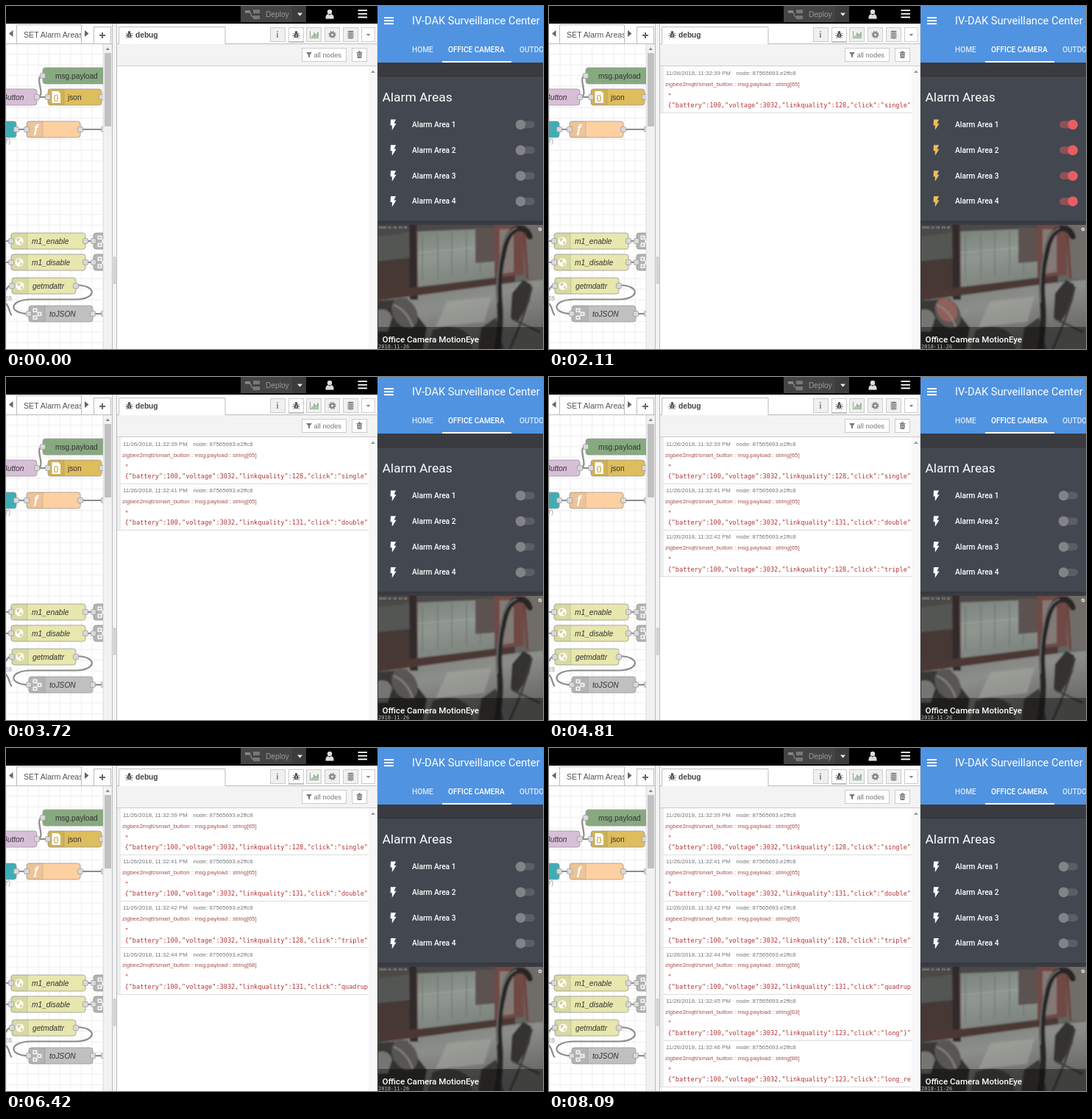
Animation of 730x467 px, one loop 8.16 s. Source, as an HTML page:

```html
<!DOCTYPE html>
<html lang="en">
<head>
<meta charset="utf-8">
<title>Smart button flow</title>
<style>
html, body { margin: 0; width: 100%; height: 100%; overflow: hidden; background: #fff; }
svg { display: block; width: 730px; height: 467px; }
text { white-space: pre; }
.ui { font-family: "Liberation Sans", Arial, sans-serif; font-size: 10.2px; }
.mat { font-family: Roboto, sans-serif; fill: #fff; }
.mono { font-family: "DejaVu Sans Mono", monospace; font-size: 8.59px; fill: #b23636; }
.small { font-size: 7.95px; }
.med { font-weight: 500; }
</style>
</head>
<body>
<svg id="stage" viewBox="0 0 730 467" xmlns="http://www.w3.org/2000/svg"></svg>
<script>
const LOOP = 8160;
const ON_AT = 1080, OFF_AT = 2980;
const messages = [
  { at: 950, sec: 39, len: 65, link: 128, click: 'single"' },
  { at: 2850, sec: 41, len: 65, link: 131, click: 'double"' },
  { at: 4100, sec: 42, len: 65, link: 128, click: 'triple"' },
  { at: 5450, sec: 44, len: 68, link: 131, click: 'quadruple"' },
  { at: 6500, sec: 45, len: 63, link: 123, click: 'long"}"' },
  { at: 7600, sec: 46, len: 86, link: 123, click: 'long_release"' }
];

const rect = (x, y, w, h, fill, more = '') =>
  `<rect x="${x}" y="${y}" width="${w}" height="${h}" fill="${fill}" ${more}/>`;
const path = (d, fill, more = '') => `<path d="${d}" fill="${fill}" ${more}/>`;
const line = (d, stroke, width = 1, more = '') =>
  path(d, 'none', `stroke="${stroke}" stroke-width="${width}" ${more}`);
const circle = (x, y, r, fill, more = '') =>
  `<circle cx="${x}" cy="${y}" r="${r}" fill="${fill}" ${more}/>`;
const text = (x, y, s, cls, more = '') =>
  `<text x="${x}" y="${y}" class="${cls}" ${more}>${s}</text>`;
const box = (x, y, w, h, stroke = '#ccc', fill = '#fff') =>
  rect(x + .5, y + .5, w, h, fill, `stroke="${stroke}"`);
const at = (x, y, s) => `<g transform="translate(${x} ${y})">${s}</g>`;

const bars = (x, y, w, gap) =>
  [0, 1, 2].map(i => rect(x, y + i * gap, w, 1.9, '#fff')).join('');

const bug = (x, y) => at(x, y,
  `<ellipse cy="1" rx="2.6" ry="3.6" fill="#555"/>` + circle(0, -3, 1.9, '#555') +
  line('M-4.5 -2L-2 0M4.5 -2L2 0M-5 1.5H5M-4.3 5L-2 3M4.3 5L2 3', '#555', .9) +
  line('M0 -1V4', '#ddd', .8));

// Editor, left part
function grid() {
  let d = '';
  for (let x = .5; x < 132; x += 14.55) d += `M${x.toFixed(1)} 52V467`;
  for (let y = 65.5; y < 467; y += 14.55) d += `M0 ${y.toFixed(1)}H132`;
  return line(d, '#eeeeee');
}
const wire = d => line(d, '#8c8c8c', 2.2);
const port = (x, y) => rect(x - 3.6, y - 3.6, 7.2, 7.2, '#d9d9d9', 'rx="2" stroke="#999" stroke-width=".8"');

function node(x, y, w, fill, label, labelX, o = {}) {
  const strip = o.icon ? path(`M${x + 3} ${y}H${x + 22}V${y + 22}H${x + 3}Q${x} ${y + 22} ${x} ${y + 19}V${y + 3}Q${x} ${y} ${x + 3} ${y}Z`, '#000', 'opacity=".06"') +
    line(`M${x + 22} ${y}V${y + 22}`, '#000', .7, 'opacity=".15"') + at(x + 11, y + 11, o.icon) : '';
  return rect(x, y, w, 22, fill, 'rx="3.5" stroke="#999" stroke-width=".8"') + strip +
    text(labelX, y + 14.6, label, 'ui', `fill="#333" ${o.italic ? 'font-style="italic"' : ''}`) +
    (o.noIn ? '' : port(x, y + 11)) + (o.noOut ? '' : port(x + w, y + 11));
}

const globe = circle(0, 0, 5.6, '#fff', 'opacity=".95"') +
  path('M-4 -2Q-2 -5 1 -4L0 -1L-2 1ZM1 1L4 0L3 4L1 4Z', '#d3d394');
const braces = path('M-5.5 -8H3L6 -5V8H-5.5Z', '#fff') +
  text(-3.4, 4, '{}', 'ui', 'fill="#c9a13c" font-weight="bold" style="font-size:9px"');
const func = text(-3, 5, 'ƒ', 'ui', 'fill="#fff" style="font-size:17px;font-weight:bold;font-style:italic"');
const blocks = [[-3, -5], [3, 0], [-3, 5]].map(([x, y]) =>
  rect(x - 2.5, y - 2.5, 6, 5.5, '#f5f5f5') + rect(x - .8, y - .8, 2.4, 2.2, '#aaa')).join('');

function flow() {
  const italic = true;
  return `<g clip-path="url(#canvas)">` + rect(0, 52, 132, 415, '#fff') + grid() +
    wire('M42 124H57M42 124C56 124 37 95 50 95') +
    wire('M14 168H28M101 168H132') +
    wire('M-6 320H7M-6 349H7M108 320H120M108 349H120') +
    wire('M-6 390C2 390 0 380 8 380M-6 403C6 404 3 418 8 421') +
    wire('M95 380C124 380 124 399 95 399.5H34C3 400 3 419 31 419') + wire('M118 419H132') +
    node(50, 84, 100, '#87a980', 'msg.payload', 67, { noOut: true }) +
    node(57, 113, 73, '#debd5c', 'json', 84, { icon: braces }) +
    node(-50, 113, 92, '#d8bfd8', 'Button', -5, { italic, noIn: true }) +
    node(-60, 157, 74, '#3fadb5', '', 0, { noIn: true }) +
    node(28, 157, 73, '#fdd0a2', '', 0, { icon: func }) + port(133, 168) +
    node(7, 309, 101, '#e7e7ae', 'm1_enable', 35, { italic, icon: globe }) +
    node(7, 338, 101, '#e7e7ae', 'm1_disable', 35, { italic, icon: globe }) +
    node(119, 309, 60, '#c0c0c0', '', 0, { icon: blocks }) +
    node(119, 338, 60, '#c0c0c0', '', 0, { icon: blocks }) +
    node(8, 370, 87, '#e7e7ae', 'getmdattr', 36, { italic, icon: globe }) +
    node(31, 408, 87, '#c0c0c0', 'toJSON', 59, { italic, icon: blocks }) + port(133, 419) +
    text(-2, 187, '7)', 'ui', 'fill="#999" style="font-size:9px"') +
    text(-2, 401, '28', 'ui', 'fill="#999" style="font-size:9px"') + '</g>';
}

function editorFrame() {
  const idle = '#f0f0f0';
  return rect(0, 0, 505, 24, '#000') +
    rect(319, 0, 89, 22, '#444') + rect(389, 0, 19, 22, '#3c3c3c') +
    rect(325, 6, 7, 3.5, '#888') + rect(336, 5, 9, 5, '#777') + rect(336, 13, 9, 5, '#777') +
    line('M330 8C335 8 331 15 337 15', '#888', 1.2) +
    text(353, 14.7, 'Deploy', 'ui', 'fill="#999"') + path('M396 9.5H403L399.5 13.5Z', '#eee') +
    circle(440, 8, 3.2, '#ddd') + path('M434.5 17.5V15Q435 11.5 438 11L440 12.5L442 11Q445 11.5 445.5 15V17.5Z', '#ddd') +
    bars(478.5, 5, 12.5, 4.7) +
    // workspace tabs and scrollbar
    rect(0, 24, 145, 28, '#fff') + line('M0 51.5H145M14.5 51V25.5H102.5V51', '#bbb') +
    `<g clip-path="url(#tab)">${text(24, 43, 'SET Alarm Areas', 'ui', 'fill="#555" style="font-size:10.6px"')}</g>` +
    path('M9.5 33V42L4 37.5ZM107 33V42L112.5 37.5Z', '#666') +
    box(119, 28, 23, 23, '#bbb') + line('M127 40H135M131 36V44', '#666', 2) +
    rect(132, 52, 13, 415, '#f1f1f1') + line('M132.5 52V467', '#e3e3e3') + path('M135.5 60H141L138.25 56.5Z', '#888') +
    rect(134, 64, 9, 100, '#c1c1c1') +
    // separator
    rect(145, 24, 6, 443, '#f3f3f3') + line('M144.5 24V467M150.5 24V467', '#bbb') +
    rect(146.5, 342, 2.5, 36, '#ddd', 'stroke="#aaa" stroke-width=".6"') +
    // sidebar
    rect(151, 24, 354, 443, '#fff') + line('M151 51.5H505', '#bbb') +
    path('M153.5 52V28.5H298V52', '#fff', 'stroke="#bbb"') +
    bug(167.5, 39) + text(176, 43, 'debug', 'ui', 'fill="#444" font-weight="bold"') +
    [359, 408, 433, 458].map(x => box(x, 29, 20, 19, '#ccc', idle)).join('') +
    box(384, 29, 20, 19) + box(483, 29, 18, 19) +
    text(367.3, 43, 'i', 'ui', 'fill="#888" font-weight="bold" style="font-family:Liberation Serif,serif;font-size:12px"') +
    line('M384 49H405', '#999') + bug(394.5, 39) +
    path('M413 34H414V43H425V44H413ZM415.5 40H417.3V42.5H415.5ZM418 36.5H419.8V42.5H418ZM420.5 38H422.3V42.5H420.5ZM423 35.5H424.8V42.5H423Z', '#8aa98b') +
    circle(443.5, 39, 2.7, 'none', 'stroke="#888" stroke-width="2.3"') +
    circle(443.5, 39, 4.3, 'none', 'stroke="#888" stroke-width="1.5" stroke-dasharray="1.8 1.58"') +
    [0, 1, 2, 3].map(i => `<ellipse cx="468.5" cy="${43.1 - i * 2.7}" rx="4.4" ry="1.8" fill="#888" stroke="${idle}" stroke-width=".6"/>`).join('') +
    path('M489.5 38H495.5L492.5 41Z', '#888') +
    rect(151, 52, 354, 29, '#f3f3f3') + line('M151 81.5H505', '#ccc') +
    box(402, 57, 60, 18) + path('M408 63H416L413 66.5V70.5L411 69V66.5Z', '#777') +
    text(418.5, 69.5, 'all nodes', 'ui', 'fill="#777" style="font-size:9.4px"') +
    box(470, 57, 20, 18) + path('M476.5 63H484.5V64H476.5ZM479 61.5H482V63H479ZM477.3 64.5H483.7L483.2 71H477.8Z', '#777') +
    line('M479.5 66V69.5M481.5 66V69.5', '#fff', .7) +
    rect(493, 82, 11, 385, '#f7f7f7') + path('M496 91H502L499 87.5Z', '#999') +
    line('M504.5 24V467', '#ddd');
}

function entry(m, i) {
  const y = i * 63.2;
  const json = `{"battery":100,"voltage":3032,"linkquality":${m.link},"click":"${m.click}`;
  return `<g class="entry" clip-path="url(#log)">` +
    rect(151, 82 + y, 5, 64, '#eee') +
    text(159, 94 + y, `11/26/2018, 11:32:${m.sec} PM`, 'ui small', 'fill="#777"') +
    text(254.5, 94 + y, 'node: 87565693.e2ffc8', 'ui small', 'fill="#777"') +
    text(158, 108.8 + y, `zigbee2mqtt/smart_button : msg.payload : string[${m.len}]`, 'ui small', 'fill="#a85050"') +
    text(161.5, 125.5 + y, '"', 'mono') + text(161.5, 138.2 + y, json, 'mono') +
    line(`M151 ${Math.round(146 + y) - .5}H493`, '#ddd') + '</g>';
}

// Dashboard, right part
const areaRow = i => {
  const y = 161.5 + i * 34.85;
  return path(`M523 ${y - 7}H530L527.5 ${y - 1.5}H530.5L524.8 ${y + 7.5}V${y + 1}H522.5Z`, '#fff', 'class="bolt"') +
    text(552, y + 3.3, `Alarm Area ${i + 1}`, 'mat med', 'style="font-size:10.2px"') +
    rect(694, y - 5, 25, 10, '#5b5e64', 'rx="5" class="track"') + circle(699.5, y, 6.8, '#7d7e80', 'class="thumb"');
};

function dashboard() {
  const tab = (x, s, o) => text(x, 63, s, 'mat med', `style="font-size:10.1px" opacity="${o}"`);
  return rect(505, 0, 225, 467, '#393b41') + rect(505, 0, 225, 77, '#5093e1') +
    bars(514, 15, 13, 4.1) +
    text(552, 24.8, 'IV-DAK Surveillance Center', 'mat', 'style="font-size:14.6px"') +
    tab(552, 'HOME', .8) + tab(601, 'OFFICE CAMERA', 1) + tab(698, 'OUTDOOR', .8) +
    rect(593, 75, 94, 2, '#fff') +
    rect(505, 95.5, 225, 197.5, '#434750') + line('M505 95.5H730M505 293H730', '#303238') +
    text(511.5, 130, 'Alarm Areas', 'mat', 'style="font-size:17.4px"') +
    [0, 1, 2, 3].map(areaRow).join('');
}

function camera() {
  const p = path;
  return `<g clip-path="url(#cam)"><g filter="url(#soft)">` + rect(500, 292, 236, 181, 'url(#floor)') +
    // room behind the glass
    p('M500 292H736V372L556 390L500 398Z', '#626561') +
    p('M558 304H674V368L558 384Z', 'url(#glass)') +
    p('M500 292H690V302L558 307L500 316Z', '#4b4846') +
    p('M500 314L548 309V344L500 348Z', '#535653') + p('M500 348L550 343V390L500 397Z', '#453836') +
    line('M566 312V374M587 310V372M606 308V368M626 308V366M645 308V364', '#6e756f', 1.6, 'opacity=".7"') +
    line('M560 336L668 326', '#a9b0a9', 1.2, 'opacity=".7"') +
    p('M638 302H664V348L638 350Z', '#5c5351') +
    p('M664 298H704V366L664 371Z', '#6f4844') + p('M671 304H690V362L671 365Z', '#837a76') +
    p('M706 292H736V372L710 371Z', '#706d69') + line('M704 298L709 371', '#753c38', 3) +
    // frames
    p('M548 292H558L560 400H549Z', '#302a29') + line('M559 306V386', '#684541', 1.3) +
    p('M500 388L548 384L692 367V376L560 394L500 402Z', '#4c3936') +
    // floor, lamp, cables and chair
    p('M500 402L546 398L552 473H500Z', '#393836') +
    p('M600 402L660 396L650 430L584 437Z', '#a9aba6', 'opacity=".5"') +
    p('M506 430Q525 402 548 407L572 438L566 473H506Z', '#30302f') +
    `<ellipse cx="542" cy="418" rx="16" ry="22" fill="#595755" transform="rotate(-32 542 418)"/>` +
    `<ellipse id="glow" cx="541" cy="414" rx="13" ry="17" fill="#a8645d" transform="rotate(-32 541 414)"/>` +
    line('M527 407Q545 414 553 437', '#8a8783', 2) +
    p('M500 416Q519 407 525 424L519 443H500Z', '#767571') +
    p('M580 441Q611 430 628 447L636 473H571Z', '#4a4846') +
    p('M646 438L666 424L678 473H641Z', '#3c3a38') + p('M688 391L703 373L714 379L712 402L696 430L686 425Z', '#353331') +
    line('M666 473Q674 438 671 403Q668 366 676 336Q681 308 695 303Q708 301 712 314', '#272626', 8, 'stroke-linecap="round"') +
    line('M668 404Q666 366 673 335Q678 308 694 302', '#7b7b79', 1.6) +
    line('M682 473Q706 422 715 382M688 426L726 444', '#3f3d3b', 3) + '</g>' +
    rect(505, 437, 225, 30, '#000', 'opacity=".4"') +
    text(507, 303, '2018-11-26 23:32', 'mono', 'style="font-size:4px;fill:#bbb"') +
    text(506, 466, '2018-11-26', 'mono', 'style="font-size:7px;fill:#bbb"') +
    circle(726, 304, 2, 'none', 'stroke="#fff" stroke-width=".9"') + line('M724 302L728 306', '#fff', .8) +
    text(511.5, 457.5, 'Office Camera MotionEye', 'mat med', 'style="font-size:11.6px"') + '</g>';
}

const clip = (id, x, y, w, h) => `<clipPath id="${id}">${rect(x, y, w, h, '#000')}</clipPath>`;
const shade = (id, ...stops) => `<linearGradient id="${id}" x2=".3" y2="1">` +
  stops.map(([at, color]) => `<stop offset="${at}" stop-color="${color}"/>`).join('') + '</linearGradient>';
const stage = document.getElementById('stage');
stage.innerHTML = '<defs>' + clip('canvas', 0, 52, 132, 415) + clip('tab', 15, 26, 87, 25) +
  clip('log', 151, 82, 342, 385) + clip('cam', 506, 298, 224, 169) +
  shade('floor', [.4, '#757772'], [.7, '#8c8e89'], [1, '#6a6b67']) +
  shade('glass', [0, '#7a827c'], [.5, '#8f9790'], [1, '#7d837d']) +
  '<filter id="soft"><feGaussianBlur stdDeviation="1"/></filter></defs>' +
  flow() + editorFrame() + messages.map(entry).join('') + dashboard() + camera();

const all = name => [...stage.querySelectorAll('.' + name)];
const entries = all('entry'), bolts = all('bolt'), tracks = all('track'), thumbs = all('thumb');
const glow = document.getElementById('glow');
const ease = (t, start, span) => {
  const k = Math.min(1, Math.max(0, (t - start) / span));
  return k * k * (3 - 2 * k);
};
const mix = (a, b, k) => `rgb(${a.map((v, i) => Math.round(v + (b[i] - v) * k))})`;

function render(t) {
  entries.forEach((e, i) => e.setAttribute('display', t >= messages[i].at ? 'inline' : 'none'));
  const on = ease(t, ON_AT, 140) - ease(t, OFF_AT, 140);
  const armed = t >= ON_AT && t < OFF_AT;
  bolts.forEach(b => b.setAttribute('fill', armed ? '#efbd55' : '#fff'));
  tracks.forEach(r => r.setAttribute('fill', mix([91, 94, 100], [139, 82, 87], on)));
  thumbs.forEach(c => {
    c.setAttribute('cx', 699.5 + 12.5 * on);
    c.setAttribute('fill', mix([130, 131, 134], [232, 94, 99], on));
  });
  glow.setAttribute('opacity', .7 * on);
}

const start = performance.now();
function tick() {
  render((performance.now() - start) % LOOP);
  requestAnimationFrame(tick);
}
tick();
</script>
</body>
</html>
```
